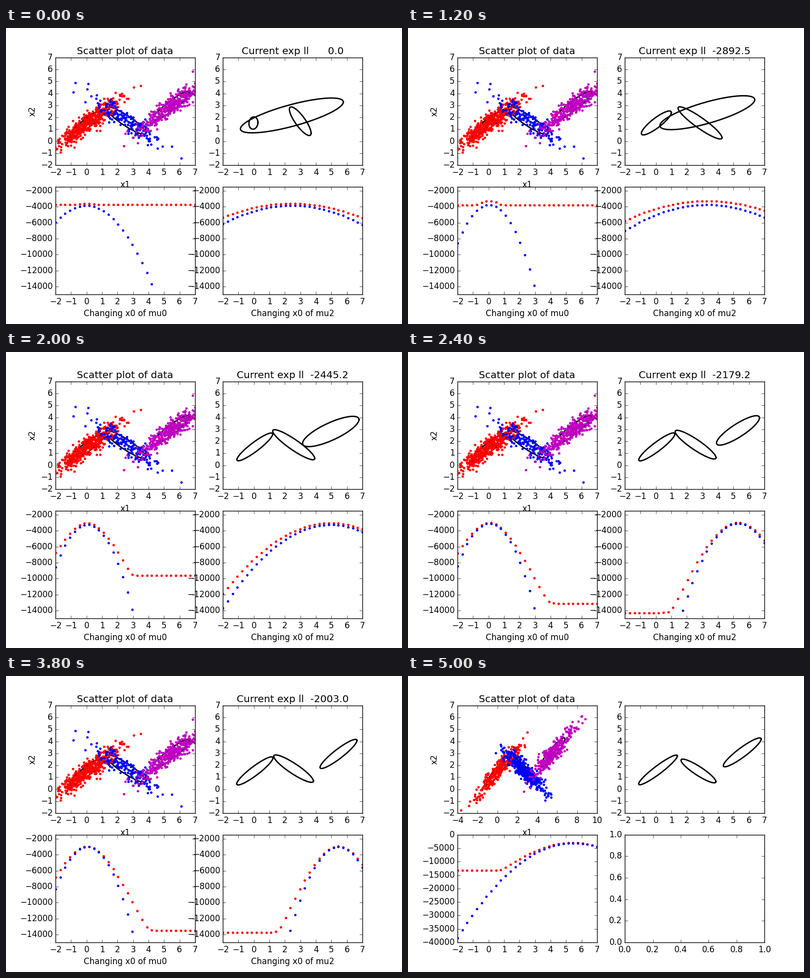
A matplotlib script for the animation above (5.2 s loop, 800 px wide and 600 px high).

```python
import numpy as np
import matplotlib.pyplot as plt
from matplotlib.animation import FuncAnimation

plt.style.use("classic")
plt.rcParams["font.family"] = "DejaVu Sans"

FRAMES, INTERVAL = 26, 200
FIRST_END, SECOND_END = 20, 25      # frames where the runs stop
COLORS = "rbm"
CONTOUR = 1.12                      # drawn ellipse size in standard deviations
GRID = np.linspace(-2, 7, 30)
TURN = np.linspace(0, 2 * np.pi, 200)


def pose(mx, my, sx, sy, r):
    """Mean and covariance of a drawn ellipse as one vector."""
    return np.array([mx, my, sx * sx, r * sx * sy, sy * sy])


# Ellipses at the start and the end of the first run
START = [pose(-.03, 1.53, .29, .515, .1), pose(2.99, 1.68, .70, 1.197, -.83),
         pose(2.45, 2.165, 3.32, 1.455, .77)]
FINAL = [pose(.06, 1.54, 1.17, 1.175, .92), pose(2.56, 1.73, 1.28, 1.145, -.9),
         pose(5.46, 2.96, 1.19, 1.217, .92)]
WIDE = pose(3.13, 1.35, 1.43, 1.36, -.92)   # the middle one swells on its way

SECOND_FIT = [pose(.157, 1.66, 1.253, 1.28, .94),
              pose(.645, 2.34, .12, .16, -.95),
              pose(4.085, 2.07, 1.875, 1.42, .5)]
THIRD_FIT = [pose(.134, 1.62, 1.246, 1.24, .94),
             pose(2.745, 1.535, 1.125, .99, -.9),
             pose(5.57, 3.09, 1.22, 1.207, .92)]


def ease(i, mid, width):
    """S-curve from 0 at the first frame to 1, halfway near mid."""
    s = 1 / (1 + np.exp((mid - np.array([0, i])) / width))
    return (s[1] - s[0]) / (1 - s[0])


def blend(a, b, t):
    return a + (b - a) * t


def morph(a, b, mean_t, cov_t):
    return blend(a, b, np.array([mean_t] * 2 + [cov_t] * 3))


def first_fit(i):
    grow = ease(i, 5, 1.4)
    swell = ease(i, 1.5, .5)
    left = morph(START[0], FINAL[0], grow, grow)
    middle = morph(START[1], WIDE, swell, swell)
    middle = morph(middle, FINAL[1], ease(i, 6, 1), ease(i, 10, 1.7))
    right = morph(START[2], FINAL[2], ease(i, 7.4, 1.6), ease(i, 8.1, 1.35))
    return [left, middle, right]


def hill(peak, centre, left, right=None, flat=0, floor=-99):
    """Parabola whose sides straighten out and settle on a floor."""
    d = GRID - centre
    drop = np.where(d < 0, left, left if right is None else right) * d * d
    drop = drop * 2 / (1 + np.sqrt(1 + (d * flat) ** 2))
    soft = .05 * (peak - floor) if floor > -99 else .01
    return soft * np.logaddexp((peak - drop) / soft, floor / soft)


def first_curves(i, fit):
    """Log-likelihoods, in thousands, around the left and right means."""
    red_peak = blend(-3.61, -2.95, ease(i, 6, 2))
    blue_peak = blend(-3.86, -3.0, ease(i, 8.8, 1.4))
    sink = ease(i, 9.7, .71)
    narrow = ease(i, 11.3, .6)
    mu0 = fit[0][0], fit[2][0]
    left = (hill(red_peak, mu0[0], blend(.3, 1.18, ease(i, 6, 1.2)),
                 blend(.3, 1.24, ease(i, 6, 1.2)), .6,
                 blend(-3.74, -13.5, sink)),
            hill(blue_peak, mu0[0], blend(.547, 1.26, ease(i, 2.8, 1.5))))
    right = (hill(red_peak, mu0[1], blend(.088, 1.052, narrow), None,
                  .417 * narrow, blend(-16, -13.76, narrow)),
             hill(blue_peak, mu0[1], blend(.116, 1.088, narrow)))
    return left, right


def exp_ll(i):
    if i < FIRST_END:
        return np.interp(i, [0, 1, 3, 8, 12, 16, 19],
                         [0, -3390, -3164.4, -2711.3, -2179.2, -2010.9, -2003])
    return -2883.2 + .4 * (i - 21)


def shape(p, u, v):
    """Map unit-circle coordinates onto the ellipse p."""
    sx = np.sqrt(p[2])
    k = p[3] / sx
    return p[0] + sx * u, p[1] + k * u + np.sqrt(p[4] - k * k) * v


def ellipse(ax, p):
    ax.plot(*shape(p, np.cos(TURN), np.sin(TURN)), "k", lw=2)


def dots(ax, x, y, color):
    ax.plot(x, y, ".", color=color, mec=color, mew=.5, ms=6)


def sample(seed, truth, counts):
    """Normal clouds with exactly the wanted mean and spread."""
    rng = np.random.default_rng(seed)
    clouds = []
    for p, n in zip(truth, counts):
        z = rng.standard_normal((2, n))
        z = (z - z.mean(1, keepdims=True)) / z.std(1, keepdims=True)
        clouds.append(shape(p, *(z / CONTOUR)))
    return truth, clouds


FIRST = sample(3, FINAL, (460, 170, 370))
SECOND = sample(11, FINAL, (280, 400, 320))
THIRD = sample(7, THIRD_FIT, (300, 400, 300))

fig = plt.figure(figsize=(8, 6), dpi=100, facecolor="w")
axes = [fig.add_subplot(2, 2, n) for n in (1, 2, 3, 4)]


def frame_axis(ax, xlim, ylim, xstep, ystep):
    """Set the limits and put ticks on multiples of the steps."""
    for lim, step, set_lim, set_ticks in (
            (xlim, xstep, ax.set_xlim, ax.set_xticks),
            (ylim, ystep, ax.set_ylim, ax.set_yticks)):
        first, last = np.ceil(lim[0] / step), np.floor(lim[1] / step + 1e-9)
        set_ticks(np.arange(first, last + 1) * step)
        set_lim(lim)


def draw_data(ax, data, xlim, ylim, xstep):
    truth, clouds = data
    for p in truth:
        ellipse(ax, p)
    for (x, y), color in zip(clouds, COLORS):
        dots(ax, x, y, color)
    frame_axis(ax, xlim, ylim, xstep, 1)
    ax.set_title("Scatter plot of data")
    ax.set_xlabel("x1")
    ax.set_ylabel("x2")


def draw_fit(ax, fit, title):
    for p in fit:
        ellipse(ax, p)
    frame_axis(ax, (-2, 7), (-2, 7), 1, 1)
    ax.set_title(title)


def draw_curves(ax, red, blue, label="", ylim=(-15000, -1500), ystep=2000):
    dots(ax, GRID, red * 1000, "r")
    dots(ax, GRID, blue * 1000, "b")
    frame_axis(ax, (-2, 7), ylim, 1, ystep)
    ax.set_xlabel(label)


def draw(i):
    for ax in axes:
        ax.clear()
    data_ax, fit_ax, left_ax, right_ax = axes
    title = "Current exp ll %8.1f" % exp_ll(i)
    if i < FIRST_END:
        fit = first_fit(i)
        left, right = first_curves(i, fit)
        draw_data(data_ax, FIRST, (-2, 7), (-2, 7), 1)
        draw_fit(fit_ax, fit, title)
        draw_curves(left_ax, *left, "Changing x0 of mu0")
        draw_curves(right_ax, *right, "Changing x0 of mu2")
        return axes
    if i < SECOND_END:
        draw_data(data_ax, SECOND, (-4, 10), (-2, 6), 2)
        draw_fit(fit_ax, SECOND_FIT, title)
        draw_curves(left_ax, hill(-3.49, 4.1, .1795, .155),
                    hill(-3.56, 4.11, .1846))
    else:
        draw_data(data_ax, THIRD, (-4, 10), (-2, 7), 2)
        draw_fit(fit_ax, THIRD_FIT, "")
        draw_curves(left_ax, hill(-2.97, 5.4, .58, None, .2, -13.24),
                    hill(-3.06, 5.5, .627), "", (-40000, 0), 5000)
    frame_axis(right_ax, (0, 1), (0, 1), .2, .2)
    return axes


anim = FuncAnimation(fig, draw, frames=FRAMES, init_func=lambda: draw(0),
                     interval=INTERVAL, repeat=True, repeat_delay=0, blit=False)
plt.show()
```
